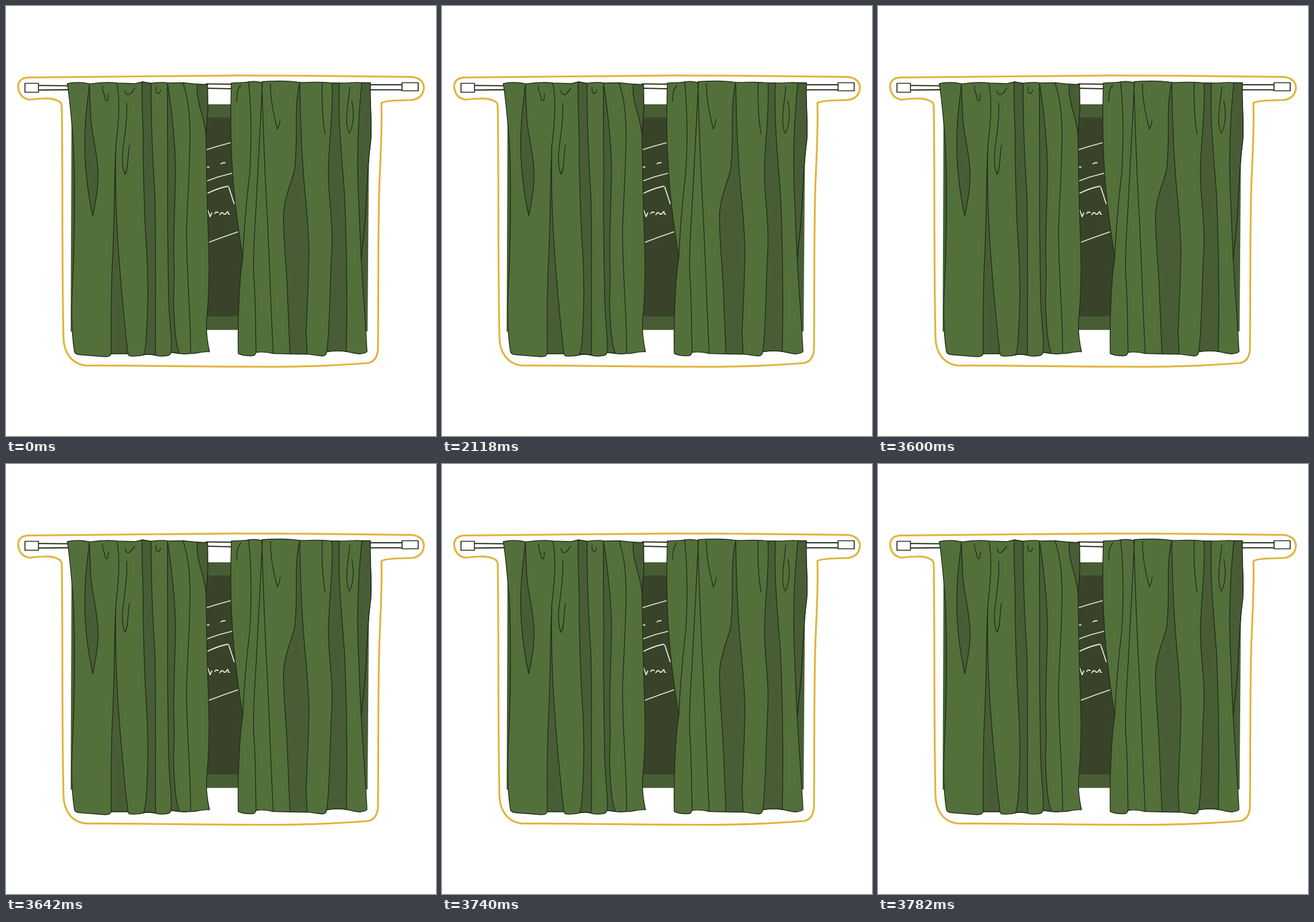
Write an HTML page that moves like this. It is 748 px wide and 748 px high and loops after 3.81 s.

```html
<!DOCTYPE html>
<html lang="en">
<head>
<meta charset="utf-8">
<title>Curtains</title>
<style>
  html, body { margin: 0; width: 100%; height: 100%; overflow: hidden; background: #fff; }
  svg { display: block; width: 100vw; height: 100vh; }
  #window { transform-origin: 374px 374px; }
  path, rect { stroke-linecap: round; stroke-linejoin: round; }
  .border { fill: #fff; stroke: #e0b43c; stroke-width: 3.2; }
  .rod { fill: #fff; stroke: #222a18; stroke-width: 1.7; }
  .bar { fill: none; stroke: #222a18; stroke-width: 2.1; }
  .frame { fill: #485d35; }
  .board { fill: #39432a; }
  .chalk { fill: none; stroke: #e9eddc; stroke-width: 1.8; }
  .cloth { fill: #53703b; }
  .fold { fill: #485d35; }
  .crease { fill: none; }
  .cloth, .fold, .crease { stroke: #232d18; stroke-width: 1.4; }
</style>
</head>
<body>
<svg viewBox="0 0 748 748">
<g id="window">
  <path class="border" d="M21 140Q22 125 39 124.300C160 123.500 280 121 400 120.800C500 120.800 620 122 706 123.300Q727 126 727 143Q725 161 706 163.500Q690 164 675 164.500Q656 166 653 169C655 220 650 280 649 330C647 420 648 520 647 598Q645 618 630 621C560 627 480 628 440 627.500C330 627.500 220 625 140 625.500C113 623 101 602 100 578C97 450 99 300 97 175Q97 168 92 166Q82 160 66 161Q54 161 42 163Q23 161 21 140Z"/>

  <path class="frame" d="M114 171H632L629 566L410 563.500H350L112.500 566.500Z"/>
  <rect class="board" x="140" y="194" width="462" height="346"/>
  <g class="chalk">
    <path d="M347 250.500L368 244L390 238M347 280.500L353 280M374 274.500L377 273L381 272.500"/>
    <path d="M349 304.500L370 297L393 291M349 326.500Q368 317 386 313.500M387.500 315L397 344"/>
    <path d="M351 355L355 366.500L358 360M363 361L365 358.500L369 359M372 363L374 360L377 359.500L379 362L382 362L384 359L386 357.500L387 362L389 362.500"/>
    <path d="M353 411L380 401L403 393"/>
  </g>

  <path class="bar" d="M57 138.200L108 138.800M57 146.200L108 145.600M348 135.500L393 136M348 143L393 144M634 137H688M634 145.800H688"/>
  <rect class="rod" x="33" y="134.500" width="23.500" height="15.500"/>
  <rect class="rod" x="689" y="133.500" width="28" height="14"/>

  <g id="left">
    <path class="cloth" d="M106.500 135C120 132 135 133 146 135.500C165 133 180 132 193 134L225 135L237 132L252 134.500C265 133 275 132 281 134L308 133.500L333 136L350.500 137L351 182L348 225C349 300 350 350 352 400C354 450 354 490 350 535Q346 565 354 601.500C340 600.500 330 605.500 321 604.500Q310 606 302 604.500L287 602.500Q286 608 278 608.500Q268 610 260 607.500Q252 605 241 606.500Q228 610.500 214 608.500L212 604.700H183Q182 610.500 172 610L130 606.700Q120 606.500 119 601C114 570 113 530 116 480C120 400 120 290 117 235C114 200 111 160 106.500 135Z"/>
    <path class="fold" d="M145 136C141 175 136 205 137 250C138 295 145 340 151 364.500C156 340 161 315 160 288C158 245 148 225 147 185Z"/>
    <path class="fold" d="M191 245C188 310 189 350 186 430C182 490 183 560 183 604.700H212C208 570 203 520 199 470C193 400 189 330 191 245Z"/>
    <path class="fold" d="M237 132C235 170 240 215 238.500 260C240 330 241 380 245 430C248 490 247 540 243 590Q241 604 239 606.500Q250 604 260 607.500C260 520 261 420 259 330C254 250 252 190 252.500 134.500Z"/>
    <path class="fold" d="M281 134C280 200 282 260 281 330C281 400 282 450 283 510C284 550 290 590 287 602.500L302 604.500C295 590 293 560 291.500 520C291 500 294 480 292 440C291 400 294 340 295 285C294 230 288 180 281 134Z"/>
    <path class="fold" d="M333 136C329 165 345 190 348 225L351 182L350.500 137Z"/>
    <path class="crease" d="M193 134C199 170 196 200 191 245M308 133.500C318 165 320 190 320 225C320 285 316 330 314 390C314 470 322 540 321 604.500"/>
    <path class="crease" d="M168 139C166 150 173 152 172 161Q178 172 178 153M207 147Q208 155 214 154Q218 152 224 143M261 141Q260 152 265 152Q268 152 269 146"/>
    <path class="crease" d="M210 169C212 200 205 230 203 255C201 275 204 285 207 293C213 285 211 262 215 242"/>
  </g>

  <g id="right">
    <path class="cloth" d="M392 134C400 133 415 134 422 132Q435 130 444 133L446 131.500C470 130 495 130 511 133C530 133 550 131 567 134H580C600 134 610 132 619 133.500H634C632 160 637 200 634.500 235C631 260 629 290 627 330C625 385 620 410 618 440C621 500 625 540 628 601.500Q620 606.500 610 604.700L592 601Q575 598.500 558 601.500Q557 609.500 549 608.700L524 605.500L494 605.300L465 604.500Q450 600.500 435 602.500Q433 609.500 425 608.500Q412 608.500 404 604.500C403 560 405 480 412 437C404 390 396 330 393 270C390 220 391 170 392 134Z"/>
    <path class="fold" d="M511 133C500 180 509 230 502 284C498 305 486 325 483 358C481 400 488 440 490 510L494 605.300L524 605.500L522 570C523 540 526 490 527 430C527 390 522 350 518 300C514 250 512 200 511 133Z"/>
    <path class="fold" d="M567 134C570 180 562 230 561 285C560 330 569 370 567 420C563 480 564 560 558 601.500Q575 598.500 592 601C594 500 592 400 589 330C584 260 577 200 580 134Z"/>
    <path class="fold" d="M619 133.500C612 200 610 280 614 350Q616 405 618 440C620 410 625 385 627 330C629 290 631 260 634.500 235C637 200 632 160 634 134Z"/>
    <path class="crease" d="M422 132C427 180 427 240 424 290C418 340 414 390 412 437M446 133C443 200 440 250 436 330C433 390 429 430 431 470C434 500 434 560 435 602.500M445 133C447 200 449 260 453 340C458 420 460 520 465 604.500"/>
    <path class="crease" d="M408 137Q407 141 403 146Q402 152 401 166M460 135C460 165 466 190 472 214Q475 210 477 197M550 134C549 170 551 200 555 223"/>
    <path class="crease" d="M598 141C596 165 591 190 593 205Q595 220 597 221C602 215 605 195 604 183Q603 168 601 166"/>
  </g>
</g>
</svg>
<script>
  const LOOP = 3810;
  // [start in ms, tilt in degrees], each pose held until the next
  const tilts = [[0, 0], [3530, 2], [3600, 0], [3670, -2], [3740, 0], [LOOP, 0]];
  document.getElementById('window').animate(
    tilts.map(([ms, deg]) => ({
      offset: ms / LOOP,
      transform: `rotate(${deg}deg)`,
      easing: 'steps(1, end)'
    })),
    { duration: LOOP, iterations: Infinity }
  );
</script>
</body>
</html>
```
